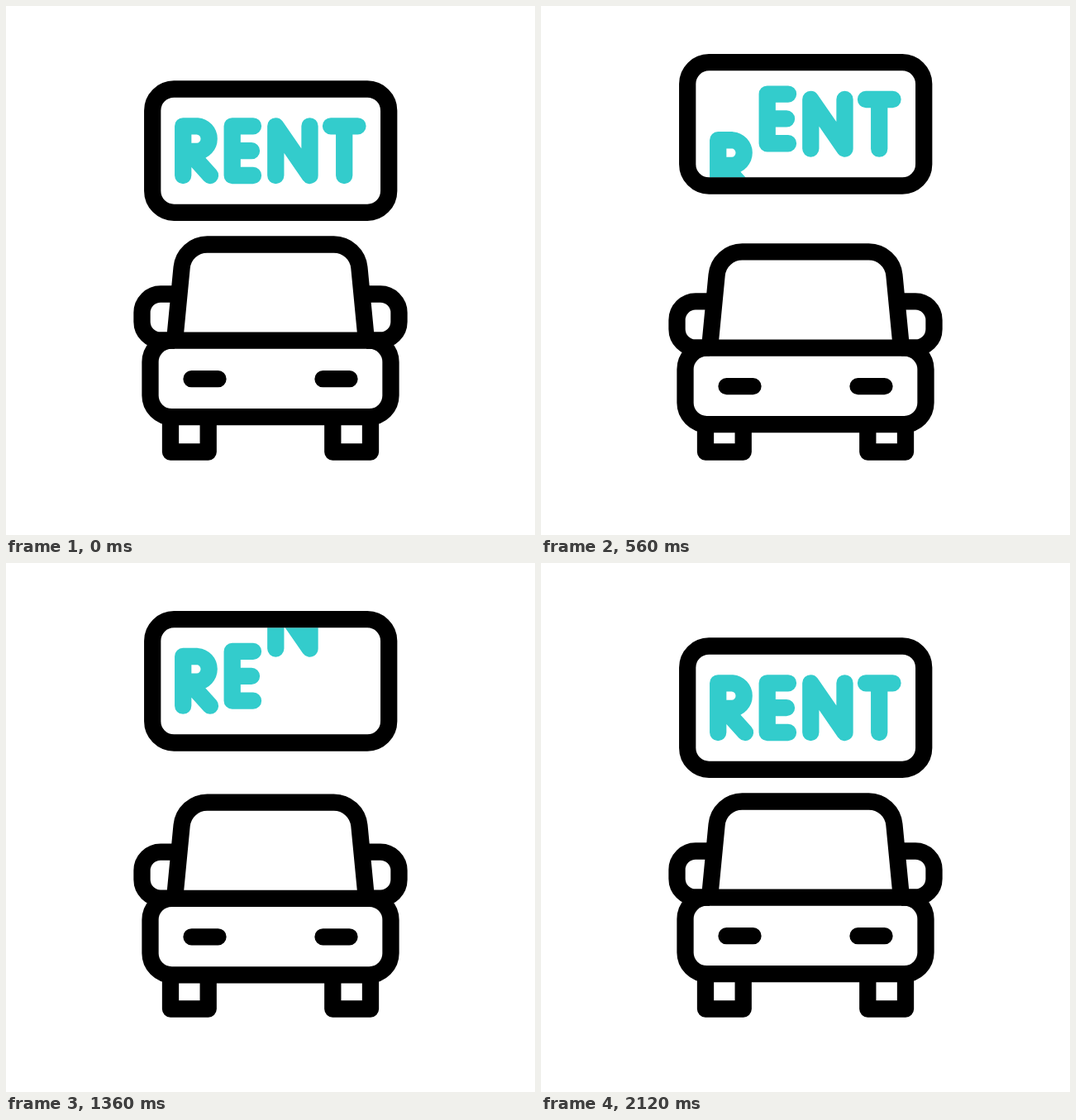
Write an HTML page with a canvas that moves like this. It is 640x640 px and loops after 2160 ms.

```html
<!DOCTYPE html>
<html lang="en">
<head>
<meta charset="utf-8">
<title>Car rental</title>
<style>
  html, body { margin: 0; width: 100%; height: 100%; overflow: hidden; background: #fff; }
  canvas { display: block; width: 640px; height: 640px; }
</style>
</head>
<body>
<canvas id="stage" width="640" height="640"></canvas>
<script>
const ctx = document.getElementById('stage').getContext('2d');
const LOOP = 2160, STEP = 40, START = 113;
const INK = '#000', TEAL = '#33cccc';

const shape = d => new Path2D(d);
const mirror = path => {
  const out = new Path2D(path);
  out.addPath(path, new DOMMatrix([-1, 0, 0, 1, 640, 0]));
  return out;
};
const box = (x, y, w, h, r) => {
  const p = new Path2D();
  p.roundRect(x, y, w, h, r);
  return p;
};

const wheels = mirror(shape('M199 500V539.5H244.7V500'));
const sides = mirror(shape('M205 348.5H187A22.5 22.5 0 0 0 164.5 371V382A22.5 22.5 0 0 0 187 404.5H204'));
const cabin = shape('M204.1 404.5L212.6 316.5A31 31 0 0 1 243.5 288.5H396.5A31 31 0 0 1 427.4 316.5L435.9 404.5');
const hull = box(174.5, 404.7, 291, 92.5, 26);
const lamps = mirror(shape('M224.5 451.2H256.5'));
const sign = box(177.2, 100.5, 286, 149.3, 26);
const panel = box(187, 110.5, 266, 129.3, 16);

const letters = [
  { delay: 0, path: shape('M214.2 205V145.3H231.5A15.4 15.4 0 0 1 231.5 176H214.2M229 185L247 205') },
  { delay: 240, path: shape('M299 145.3H273.7V205H299M273.7 175.2H297') },
  { delay: 430, path: shape('M326.3 205V145.3L367.5 205V145.3') },
  { delay: 611, path: shape('M393 145.3H425.5M409.2 145.3V205') }
];

// Eased progress from a to b, clamped to 0..1
function ease(t, a, b) {
  const x = Math.min(1, Math.max(0, (t - a) / (b - a)));
  return x * x * (3 - 2 * x);
}

function signY(t) {
  return -32.3 * (ease(t, START, 533) - ease(t, 1706, 2126));
}

function carY(t) {
  const beat = (t - START) / 160;
  if (beat < 0 || beat > 12) return 0;
  const x = beat % 2;
  return 10 * ease(x < 1 ? x : 2 - x, 0, 1);
}

// Small hop, drop out below, then drop in from above
function letterY(t) {
  if (t < 376) return -7.3 * ease(t, START, 376);
  if (t < 753) return -7.3 + 117.3 * ease(t, 376, 753);
  return -110 * (1 - ease(t, 753, 1181));
}

function stroke(paths, color) {
  ctx.strokeStyle = color;
  for (const p of paths) ctx.stroke(p);
}

function shifted(y, draw) {
  ctx.save();
  ctx.translate(0, y);
  draw();
  ctx.restore();
}

function render(t) {
  ctx.fillStyle = '#fff';
  ctx.fillRect(0, 0, 640, 640);
  ctx.lineWidth = 20.3;
  ctx.lineJoin = 'round';

  ctx.lineCap = 'butt';
  stroke([wheels], INK);
  shifted(carY(t), () => {
    stroke([sides, cabin, hull], INK);
    ctx.lineCap = 'round';
    stroke([lamps], INK);
  });

  ctx.lineCap = 'round';
  shifted(signY(t), () => {
    ctx.save();
    ctx.clip(panel);
    for (const { delay, path } of letters) {
      shifted(letterY(t - delay), () => stroke([path], TEAL));
    }
    ctx.restore();
    stroke([sign], INK);
  });
}

const begin = performance.now();
function tick() {
  const t = (performance.now() - begin) % LOOP;
  render(Math.floor(t / STEP) * STEP);
  requestAnimationFrame(tick);
}
tick();
</script>
</body>
</html>
```
